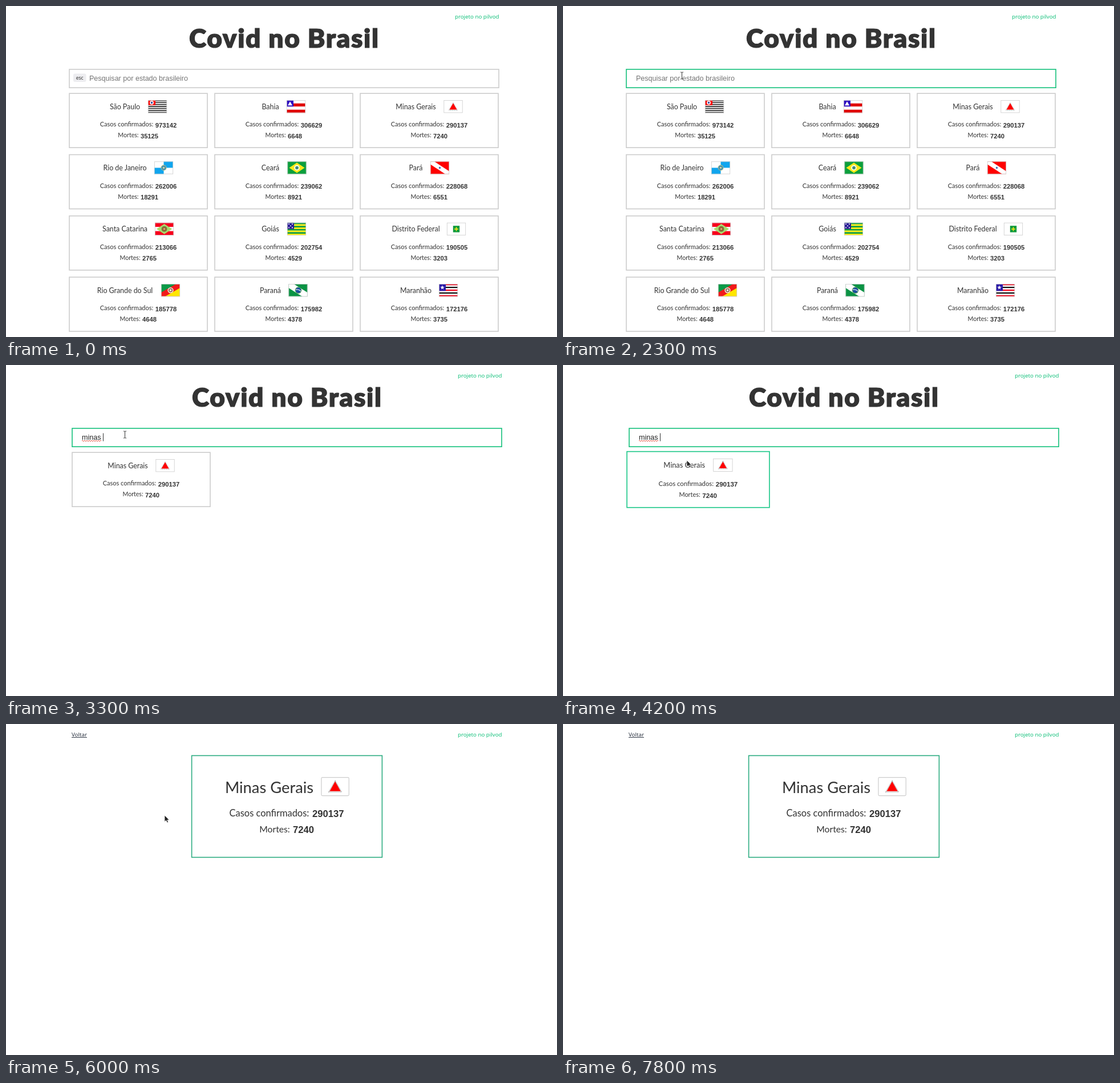
These frames come from a looping animation (966 by 580 pixels, 7900 ms). An HTML page:

```html
<!DOCTYPE html>
<html lang="pt-BR">
<head>
<meta charset="utf-8">
<title>Covid no Brasil</title>
<style>
  html, body { margin: 0; width: 100%; height: 100%; overflow: hidden; background: #fff; }
  svg { display: block; width: 966px; height: 580px; }
  text { fill: #333; white-space: pre; }
  .jost { font-family: Lato, sans-serif; }
  .title { font-size: 46px; font-weight: 900; letter-spacing: 1.6px; stroke: #333; stroke-width: 1.2; }
  .num { font-family: "Liberation Sans", Arial, sans-serif; font-weight: 700; }
  .field { font-family: "Liberation Sans", Arial, sans-serif; font-size: 12.56px; }
  .ui { font-family: "Noto Sans", sans-serif; font-size: 9.7px; }
  .link { font-weight: 500; text-anchor: end; }
  .mid { text-anchor: middle; }
  .frame { fill: #fff; stroke: #ccc; stroke-width: 1.6; }
</style>
</head>
<body>
<svg id="stage" viewBox="0 0 966 580"></svg>
<script>
const LOOP = 7900, STEP = 100;
const GREEN = '#13c07b', BRIGHT = '#1fc88a', GREY = '#ccc';
const FOCUS = 1800, BLUR = 4930, HOVER = 4100, OPEN = 5400;
const KEYS = [[2600, 'm'], [2700, 'i'], [2800, 'n'], [2900, 'a'], [3000, 's'], [3200, ' ']];
const POINTER = [
  [100, -8, -14], [300, 30, 30], [600, 120, 88], [1000, 208.5, 120], [1600, 208.5, 120],
  [1800, 208.5, 122], [3800, 208.5, 122], [4100, 213, 155], [4400, 225, 191], [5300, 225, 191],
  [5600, 245, 236], [5700, 250, 236], [6000, 278, 160], [6500, 195, 62], [6900, 92, 4], [7000, 82, -16]
];

// Flags are drawn in a 33 x 22 box.
const box = (x, y, w, h, fill) => `<rect x="${x}" y="${y}" width="${w}" height="${h}" fill="${fill}"/>`;
const poly = (points, fill) => `<polygon points="${points}" fill="${fill}"/>`;
const dot = (x, y, r, fill) => `<circle cx="${x}" cy="${y}" r="${r}" fill="${fill}"/>`;
const stripes = (n, ...fills) => Array.from({ length: n }, (_, i) =>
  box(0, i * 22 / n, 33, 22 / n + .05, fills[i % fills.length])).join('');
function star(x, y, r, fill) {
  const points = Array.from({ length: 10 }, (_, i) => {
    const a = i * Math.PI / 5, d = i % 2 ? r * .4 : r;
    return `${(x + d * Math.sin(a)).toFixed(2)},${(y - d * Math.cos(a)).toFixed(2)}`;
  });
  return poly(points.join(' '), fill);
}

const flags = {
  sp: stripes(13, '#1a1a1a', '#fff') + box(0, 0, 13, 8.5, '#f00') + dot(6.5, 4.2, 3.4, '#fff') + dot(6.5, 4.2, 1.8, '#3a4fa0'),
  ba: stripes(4, '#fff', '#e00000') + box(0, 0, 12, 11, '#3010c0') + poly('6,2 10,9 2,9', '#fff'),
  mg: box(0, 0, 33, 22, '#fff') +
    '<polygon points="16.5,4.4 24,17.4 9,17.4" fill="none" stroke="#999" stroke-width="1" stroke-dasharray=".8 .6"/>' +
    poly('16.5,5.1 22.9,16.4 10.1,16.4', '#f00'),
  rj: box(0, 0, 33, 22, '#fff') + box(16.5, 0, 16.5, 11, '#10a5ee') + box(0, 11, 16.5, 11, '#10a5ee') +
    dot(16.5, 11, 5, '#a9b98a') + dot(16.5, 11, 3.8, '#3c8fb5') + dot(16.5, 11, 1.8, '#d5cf9a'),
  ce: box(0, 0, 33, 22, '#0b9f3c') + poly('16.5,2 30,11 16.5,20 3,11', '#fbe91b') +
    dot(16.5, 11, 4.7, '#fff') + dot(16.5, 11, 3, '#5aa06a') + dot(16.5, 11, 1.4, '#2c6f9e'),
  pa: box(0, 0, 33, 22, '#f00') + poly('0,0 7,0 33,17 33,22 26,22 0,5', '#fff') + star(16.5, 11, 2.6, '#1648a8'),
  sc: stripes(3, '#f8001d', '#fff', '#f8001d') + poly('16.5,2 30,11 16.5,20 3,11', '#a8dc6c') +
    dot(16.5, 11, 5, '#7a7a3c') + dot(16.5, 11, 2.8, '#b3582c') + dot(16.5, 11, 1.3, '#d8d8a0'),
  go: stripes(8, '#0c9a3c', '#ffee10') + box(0, 0, 12, 11, '#2a1c98') +
    [[3, 2.5], [9, 2.5], [6, 5.5], [3, 8.5], [9, 8.5]].map(([x, y]) => dot(x, y, 1, '#fff')).join(''),
  df: box(0, 0, 33, 22, '#fff') + box(10.8, 5.3, 11.4, 11.4, '#0c9a3c') +
    box(15.7, 7.5, 1.6, 7, '#ffe81a') + box(13, 10.2, 7, 1.6, '#ffe81a'),
  rs: box(0, 0, 33, 22, '#f11a1a') + poly('0,0 26,0 0,15', '#0b9a48') + poly('33,7 33,22 7,22', '#ffe600') +
    dot(16.5, 11, 5.2, '#f1dfd0') + dot(16.5, 11, 3.4, '#8d5a45') + dot(16.5, 11, 1.8, '#fff'),
  pr: box(0, 0, 33, 22, '#0a9344') + poly('0,0 9,0 33,15 33,22 24,22 0,7', '#fff') +
    dot(17, 11, 5.8, '#5aa35a') + dot(17, 11, 4.8, '#1d4ea0') +
    '<path d="M12.4 10q5-1.5 9 2.6" fill="none" stroke="#fff" stroke-width="1.1"/>',
  ma: stripes(9, '#f00018', '#fff', '#111', '#fff') + box(0, 0, 12, 12.2, '#2a18a8') + star(6, 6.2, 4, '#fff')
};

// name, measured name width, flag, cases, deaths
const STATES = [
  ['São Paulo', 53, 'sp', 973142, 35125], ['Bahia', 29, 'ba', 306629, 6648],
  ['Minas Gerais', 70, 'mg', 290137, 7240], ['Rio de Janeiro', 75, 'rj', 262006, 18291],
  ['Ceará', 32, 'ce', 239062, 8921], ['Pará', 23, 'pa', 228068, 6551],
  ['Santa Catarina', 77, 'sc', 213066, 2765], ['Goiás', 31, 'go', 202754, 4529],
  ['Distrito Federal', 81, 'df', 190505, 3203], ['Rio Grande do Sul', 99, 'rs', 185778, 4648],
  ['Paraná', 36, 'pr', 175982, 4378], ['Maranhão', 53, 'ma', 172176, 3735]
];

const label = (x, y, size, text, cls = 'jost mid') =>
  `<text class="${cls}" x="${x}" y="${y}" font-size="${size}">${text}</text>`;
const flag = (key, x, y, scale = 1, rx = 0) =>
  `<g transform="translate(${x} ${y}) scale(${scale})">${flags[key]}` +
  `<rect x=".3" y=".3" width="32.4" height="21.4" rx="${rx}" fill="none" stroke="#ccc" stroke-width=".8"/></g>`;

function card([name, width, key, cases, deaths]) {
  const cx = 121, deathsX = cx + (39 - 6.23 * String(deaths).length) / 2;
  return `<g class="card"><rect class="frame" width="242" height="95"/>` +
    label(cx - 23.5, 27.5, 12.4, name) + flag(key, cx + width / 2 - 9.5, 12) +
    label(cx - 20.5, 58, 11, 'Casos confirmados:') + label(cx + 29.8, 59.6, 11.2, cases, 'num') +
    label(deathsX - 21.5, 77, 10.6, 'Mortes:') + label(deathsX, 78.4, 11.2, deaths, 'num') + '</g>';
}

const wave = 'M0 133' + Array.from({ length: 17 }, (_, i) => `q1 ${i % 2 ? 1.8 : -1.8} 2 0`).join('');

document.getElementById('stage').innerHTML = `
  <rect width="966" height="580" fill="#fff"/>
  <g id="page">
    <text class="ui link" x="864.5" y="22" style="fill:${GREEN}">projeto no pilvod</text>
    <g id="list">
      <text class="jost mid title" x="487.8" y="73">Covid no Brasil</text>
      <rect id="search" class="frame" x="111" y="111" width="753" height="32.2"/>
      <g id="esc"><rect x="118" y="118.5" width="22.5" height="14.5" rx="3" fill="#ededf0"/>
        <text class="ui mid" x="129.2" y="129" style="font-size:8.6px">esc</text></g>
      <g id="entry">
        <text id="value" class="field" y="130.5"></text>
        <path id="typo" d="${wave}" fill="none" stroke="#e0442c" stroke-width=".9"/>
        <rect id="caret" y="119.5" width="1" height="14" fill="#333"/>
      </g>
      ${STATES.map(card).join('')}
    </g>
    <g id="detail" transform="translate(-5 0)">
      <text class="ui" x="115" y="22" style="fill:#2c3442;text-decoration:underline">Voltar</text>
      <rect class="frame" x="325.6" y="55.4" width="333.8" height="178.2" style="stroke:#2cac80"/>
      ${label(461.5, 120.5, 27.3, 'Minas Gerais')}${flag('mg', 552.5, 93.2, 1.49, 1.2)}
      ${label(461.5, 161.5, 16.45, 'Casos confirmados:')}${label(537, 163, 16.64, 290137, 'num')}
      ${label(471, 189.5, 15.7, 'Mortes:')}${label(503, 191, 16.64, 7240, 'num')}
    </g>
  </g>
  <path id="arrow" d="M0 0V11.3L2.7 8.9L4.6 13L6.5 12.1L4.7 8.2H8.2Z" fill="#222" stroke="#fff" stroke-width=".7"/>
  <path id="beam" d="M-2.5-6H-.6L0-5.3L.6-6H2.5M0-5.3V5.3M-2.5 6H-.6L0 5.3L.6 6H2.5" fill="none" stroke="#333"/>`;

const $ = id => document.getElementById(id);
const cards = [...document.querySelectorAll('.card')];
const pen = document.createElement('canvas').getContext('2d');
pen.font = '12.56px "Liberation Sans", Arial, sans-serif';

const show = (el, on) => el.setAttribute('display', on ? 'inline' : 'none');
const move = (el, x, y, extra = '') => el.setAttribute('transform', `translate(${x} ${y})${extra}`);
const ease = (t, start, span) => {
  const p = Math.min(1, Math.max(0, (t - start) / span));
  return p * p * (3 - 2 * p);
};

function pointerAt(t) {
  const i = POINTER.findIndex(p => p[0] > t);
  if (i < 1) return null;
  const [t0, x0, y0] = POINTER[i - 1], [t1, x1, y1] = POINTER[i];
  const p = (t - t0) / (t1 - t0);
  return [x0 + (x1 - x0) * p, y0 + (y1 - y0) * p];
}

function drawSearch(t, query, lastKey) {
  const focused = t >= FOCUS && t < BLUR;
  const focus = ease(t, FOCUS, 300) - ease(t, BLUR, 300);
  $('search').style.stroke = focused ? GREEN : GREY;
  $('esc').setAttribute('opacity', focus > .8 ? 0 : 1 - focus);
  move($('entry'), 146 - 18 * focus, 0);
  $('value').textContent = query || 'Pesquisar por estado brasileiro';
  $('value').style.fill = query ? '#222' : '#757575';
  $('caret').setAttribute('x', pen.measureText(query).width);
  show($('caret'), focused && Math.floor((t - lastKey) / 500) % 2 === 0);
  show($('typo'), focused && query.endsWith(' '));
}

function drawCards(t, query) {
  const hover = ease(t, HOVER - 50, 250);
  let slot = 0;
  STATES.forEach(([name], i) => {
    const match = name.toLowerCase().startsWith(query.trim());
    const hot = name === 'Minas Gerais' && t >= HOVER;
    show(cards[i], match);
    cards[i].firstChild.style.stroke = hot ? BRIGHT : GREY;
    if (!match) return;
    const grow = hot ? ` translate(121 47.5) scale(${1 + .05 * hover}) translate(-121 -47.5)` : '';
    move(cards[i], 111 + slot % 3 * 255, 153.2 + Math.floor(slot / 3) * 107.3, grow);
    slot++;
  });
}

function drawPointer(t) {
  const at = pointerAt(t);
  const inField = at && t < OPEN && at[0] > 111 && at[1] > 110 && at[1] < 144;
  show($('arrow'), at && !inField);
  show($('beam'), inField);
  if (at) move(inField ? $('beam') : $('arrow'), ...at);
}

function render(t) {
  const typed = KEYS.filter(k => k[0] <= t);
  const query = typed.map(k => k[1]).join('');
  const lastKey = typed.length ? typed[typed.length - 1][0] : FOCUS;
  // The page widens when its scrollbar disappears.
  move($('page'), query ? 5 : 0, 0);
  show($('list'), t < OPEN);
  show($('detail'), t >= OPEN);
  drawSearch(t, query, lastKey);
  drawCards(t, query);
  drawPointer(t);
}

const start = performance.now();
function tick() {
  const t = (performance.now() - start) % LOOP;
  render(Math.floor(t / STEP) * STEP);
  requestAnimationFrame(tick);
}
tick();
</script>
</body>
</html>
```
